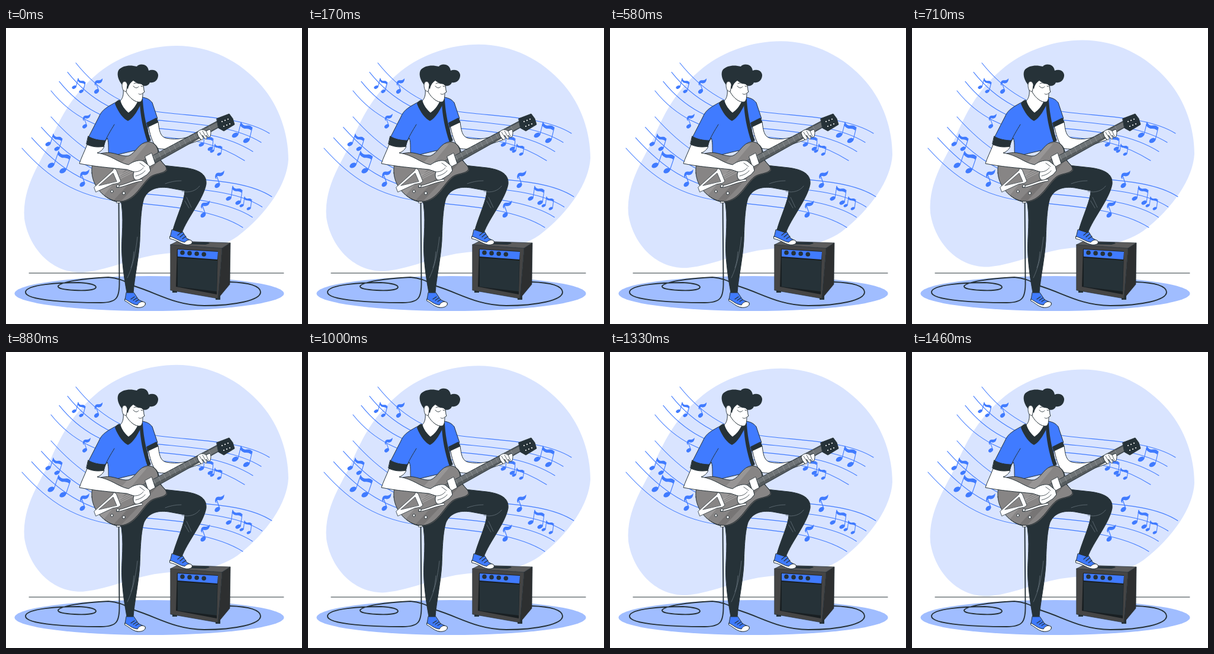
Write an HTML page with a canvas that moves like this. It is 500 px wide and 500 px high and loops after 1500 ms.

```html
<!DOCTYPE html>
<html lang="en">
<head>
<meta charset="utf-8">
<title>Guitarist</title>
<style>
html, body { margin: 0; width: 100%; height: 100%; overflow: hidden; background: #fff; }
canvas { display: block; width: 500px; height: 500px; }
</style>
</head>
<body>
<canvas id="stage" width="500" height="500"></canvas>
<script>
const ctx = document.getElementById('stage').getContext('2d');
const LOOP = 1500, LIFT = 10;
const BLUE = '#407bff', DARK = '#263238', WHITE = '#fff', PALE = '#d9e4ff';

const fill = (d, color) => { ctx.fillStyle = color; ctx.fill(new Path2D(d)); };
const line = (d, color = DARK, width = 1) => {
  ctx.strokeStyle = color;
  ctx.lineWidth = width;
  ctx.stroke(new Path2D(d));
};
const shape = (d, color, width = 1) => { fill(d, color); line(d, DARK, width); };
const oval = (x, y, rx, ry, color, turn = 0, outlined = false) => {
  ctx.beginPath();
  ctx.ellipse(x, y, rx, ry, turn, 0, Math.PI * 2);
  ctx.fillStyle = color;
  ctx.fill();
  if (outlined) {
    ctx.strokeStyle = DARK;
    ctx.lineWidth = 1;
    ctx.stroke();
  }
};

function blob(lift) {
  ctx.save();
  ctx.translate(0, -lift);
  fill('M288 30C345 30 396 56 432 98C462 133 477 179 477 222C475 263 441 314 391 352C352 379 310 377 270 381C215 386 180 408 130 413C76 415 38 370 31 322C27 266 60 226 76 188C94 148 112 112 157 75C194 46 242 30 288 30Z', PALE);
  ctx.restore();
}

// Four curves between a first and a last one, both given as control points.
function staff(first, last) {
  for (let i = 0; i < 4; i++) {
    const p = first.map((v, k) => v + (last[k] - v) * i / 3);
    line(`M${p.slice(0, 2)}C${p.slice(2, 8)}S${p.slice(8)}`, BLUE, 1.1);
  }
}

// Two heads joined by a wavy beam that runs from (x, y) to (x + w, y + h).
function notePair(x, y, w, h, headX, headY) {
  const s = Math.hypot(w, h) / 17;
  const x2 = x + w, y2 = y + h, thick = 4.2 * s;
  for (const [tx, ty] of [[x, y], [x2, y2]]) {
    oval(tx + headX, ty + headY, 4.7 * s, 3 * s, BLUE, -0.5);
    line(`M${tx} ${ty}L${tx + headX + 4 * s} ${ty + headY - s}`, BLUE, 1.1);
  }
  fill(`M${x} ${y}C${x + w * .35} ${y + h + 2 * s} ${x + w * .65} ${y + h * .2 - s} ${x2} ${y2}
    L${x2 - 1.5 * s} ${y2 + thick}C${x + w * .6} ${y + h * .3 + thick} ${x + w * .3} ${y + h + thick + s} ${x - 1.5 * s} ${y + thick}Z`, BLUE);
}

function singleNote(x, y, s) {
  ctx.save();
  ctx.translate(x, y);
  ctx.scale(s, s);
  oval(0, 0, 5.3, 3.7, BLUE, -0.7);
  line('M4 -2L-2 -19', BLUE, 1.3);
  fill('M-4 -15C-3 -23 1 -22 5 -22C8 -22 10 -24 12 -26C12 -20 9 -16 4 -16C0 -16 -1 -18 -2 -13L-1 -11C-3 -12 -4 -13 -4 -15Z', BLUE);
  ctx.restore();
}

function music() {
  staff([118, 59, 150, 99, 195, 134, 260, 142, 400, 150, 445, 178],
    [76, 106, 108, 146, 155, 176, 240, 182, 358, 196, 403, 224]);
  staff([76, 150, 118, 197, 165, 234, 240, 246, 400, 253, 449, 285],
    [27, 203, 69, 250, 116, 285, 195, 293, 351, 306, 400, 337]);
  [
    [122, 85, 12, 7, -7, 15], [80, 179, 15, 8, -9, 17], [89, 208, 20, 9, -13, 24],
    [397, 159, 19, 9, -10, 22], [335, 180, 15, 7, -5, 17], [353, 196, 12, 5, -5, 12],
    [383, 267, 16, 7, -7, 21], [403, 285, 12, 5, -5, 15]
  ].forEach(n => notePair(...n));
  [[153, 107, .85], [133, 166, .82], [129, 264, .97], [357, 266, .97], [333, 316, .95]]
    .forEach(n => singleNote(...n));
}

function floor() {
  line('M39 414H469', DARK, 1);
  oval(242, 448.5, 227.5, 29.5, '#a0bdff');
}

function cable() {
  line('M190.5 294L191.5 428C192 456 187 464 160 464C115 464 32 461 33 446C34 433 92 430 123 430C142 431 152 434 152 438C151 443 132 444 116 443C98 442 87 440 88 436C92 429 130 423 173 421C198 423 207 433 220 437C255 448 287 469 335 469C386 469 430 460 430 446C429 435 408 430 378 429', DARK, 1.9);
}

function amp() {
  fill('M281 440h8v7h-8ZM354 452h8v7h-8Z', DARK);
  shape('M278 366L290 360L379 363L365 372Z', '#5c5c5c', .7);
  fill('M300 362L342 362L344 364L337 366L299 365Z', DARK);
  shape('M365 372L379 363L378 433L358 457Z', '#2d2f30', .7);
  shape('M278 366L365 372L358 457L278 443Z', '#454545', .7);
  fill('M289 373L358 377L356 450L287 437Z', '#191f22');
  fill('M290 374L358 378L357 391L290 386Z', BLUE);
  fill('M290 388L357 393L356 445L290 437Z', DARK);
  for (let i = 0; i < 4; i++) oval(298 + i * 12.1, 379.5 + i * .9, 3.8, 3.8, DARK);
}

function legs() {
  shape('M203 447L201 459C207 463 213 470 222 472C230 472 237 469 235 464L224 459L216 447Z', BLUE);
  shape('M201 458C209 462 213 467 222 468C225 462 231 461 235 464C237 470 229 473 222 472C213 471 208 464 201 461Z', WHITE);
  line('M211 458l6 -4M215 460l6 -4M219 462l5 -3', DARK, 1.3);
  shape('M280 341L277 354C287 356 294 365 304 366C311 366 316 364 314 360L305 355L299 345Z', BLUE);
  shape('M277 352C287 355 294 361 302 362C306 357 312 357 314 360C316 365 310 367 303 366C294 364 288 358 277 356Z', WHITE);
  line('M290 350l5 -4M294 353l6 -5M298 356l6 -4', DARK, 1.3);
  shape('M193 286C201 322 194 352 196 385C198 415 202 435 204 447L215 447C217 422 224 390 226 360C227 330 228 304 233 288C240 273 254 267 275 270L302 275C302 290 288 319 282 341L297 346C306 321 333 290 338 264C340 246 324 239 302 236L265 232L220 260Z', DARK);
  line('M205 422C214 404 219 380 222 353M211 405C215 394 215 386 216 378M269 263C277 260 286 258 296 258M297 276C310 279 321 275 327 267M305 286L313 303M302 292L309 304', '#65727a', .8);
}

function fretArm() {
  shape('M240 164L257 159C259 173 260 183 270 186C290 190 306 186 323 178L329 189C301 199 274 208 255 203C246 192 243 178 240 164Z', WHITE);
}

function torso() {
  shape('M190 123C171 133 162 138 157 150L138 187L166 194L171 186C175 195 171 210 175 217L243 201L238 161L256 153L247 126C243 121 238 118 230 117L207 151Z', BLUE);
  line('M183 163C177 173 170 184 167 193', DARK, 1);
  shape('M139 183C147 188 158 190 168 190L165 201C154 202 144 200 136 196Z', DARK);
  shape('M238 160L254 152L257 159L240 167Z', DARK);
}

function head() {
  shape('M198 104C199 113 197 119 193 123C195 132 201 138 207 144C214 139 221 132 224 122Z', WHITE);
  fill('M192 121C187 123 185 125 184 128C190 143 198 153 206 157C215 153 225 137 231 120L228 116L223 123C219 132 213 139 207 143C200 138 196 131 192 121Z', DARK);
  fill('M226 126L231 120C232 145 239 174 245 190L239 193C231 169 227 148 226 126Z', DARK);
  shape('M203 91C210 84 224 84 232 94L233 105L234 108L231 110C231 119 230 124 226 125C219 126 209 119 203 108Z', WHITE);
  fill('M198 98C189 89 186 76 191 70C198 63 210 62 221 65C224 60 239 59 241 72C250 68 258 74 257 81C256 90 249 93 243 92C241 98 232 100 229 95C222 94 218 91 215 89C209 93 207 98 206 103L201 99Z', DARK);
  shape('M205 96C204 89 197 88 196 96C196 104 199 108 203 107Z', WHITE, .9);
  line('M215 98C218 102 222 102 224 99M216 94C219 92 222 93 224 94M228 98L231 99M224 111C226 113 228 112 230 111', DARK, .9);
}

const BODY = 'M145 245C144 224 150 212 166 211C181 208 194 218 207 216C220 211 223 194 240 192C252 192 258 204 257 214C258 226 272 231 271 239C266 247 251 245 243 252C230 262 218 291 194 293C172 294 147 272 145 245Z';

function guitar() {
  const metal = new Path2D(BODY);
  ctx.save();
  ctx.translate(1.5, 1.2);
  shape(BODY, '#555');
  ctx.restore();
  ctx.fillStyle = '#878585';
  ctx.fill(metal);
  ctx.save();
  ctx.clip(metal);
  fill('M145 282L224 196L238 196L158 291Z', '#989696');
  fill('M179 294L253 214L263 220L190 297Z', '#777575');
  ctx.restore();
  line(BODY);

  shape('M232 224L357 157L361 167L238 236Z', '#555b5e', .9);
  for (const offset of [-3, -1, 1, 3])
    line(`M220 ${234 + offset}L360 ${162 + offset}`, '#b4b6b7', .55);
  for (let i = 0; i < 12; i++) {
    const x = 251 + i * 8.5, y = 219 - i * 4.5;
    line(`M${x - 2} ${y - 4}l4 8`, '#a5a8aa', .5);
  }
  shape('M356 153L377 145L383 153L386 163L368 174L359 169Z', DARK);
  for (let i = 0; i < 3; i++) {
    oval(365 + i * 5, 158 - i * 2, 1.1, 1.1, WHITE);
    oval(368 + i * 5, 166 - i * 2, 1.1, 1.1, WHITE);
  }
  line('M190 250L228 229M190 253L230 232M190 256L232 235', '#c8c8c8', .6);
  shape('M149 269L180 241L182 237L186 239L194 259L190 262L180 264L152 277Z', WHITE, .8);
  shape('M157 266L181 245L187 259Z', '#878585', .7);
  line('M188 268C200 267 213 259 229 257', DARK, 3.8);
  line('M188 268C200 267 213 259 229 257', WHITE, 2.5);
  oval(189, 267, 2.3, 2.3, WHITE, 0, true);
  oval(179, 276, 2.2, 2.2, WHITE, 0, true);
  oval(199, 279, 2.4, 2.4, WHITE, 0, true);
  shape('M235 217L246 211L252 229L241 235Z', WHITE, .8);
  shape('M187 293h6v2.5h-6Z', WHITE, .7);
}

function hands() {
  shape('M137 197C133 208 127 219 124 229C149 234 175 236 204 239L216 243C214 248 215 256 220 257C226 257 232 251 238 248L244 241L242 233L232 225C226 222 215 225 207 231C190 228 177 214 154 211C160 209 164 205 166 200C155 202 146 201 137 197Z', WHITE);
  line('M216 243C224 243 228 241 232 236M219 250C227 248 232 245 235 241M226 228L234 234', DARK, .8);
  shape('M323 177C326 171 333 170 338 174L344 171C347 174 346 179 345 183C342 187 340 183 338 181C341 188 338 189 335 186L332 181C335 188 331 191 328 187L325 183Z', WHITE);
  line('M327 176L332 184M332 174L337 183M338 174L342 183', DARK, .8);
}

function draw(now) {
  const phase = (now % LOOP) / LOOP;
  const lift = LIFT * (1 - Math.abs(1 - 2 * phase));
  ctx.clearRect(0, 0, 500, 500);
  ctx.lineJoin = ctx.lineCap = 'round';
  blob(lift);
  floor();
  music();
  cable();
  amp();
  legs();
  fretArm();
  torso();
  head();
  guitar();
  hands();
}

const start = performance.now();
function tick() {
  draw(performance.now() - start);
  requestAnimationFrame(tick);
}
tick();
</script>
</body>
</html>
```
